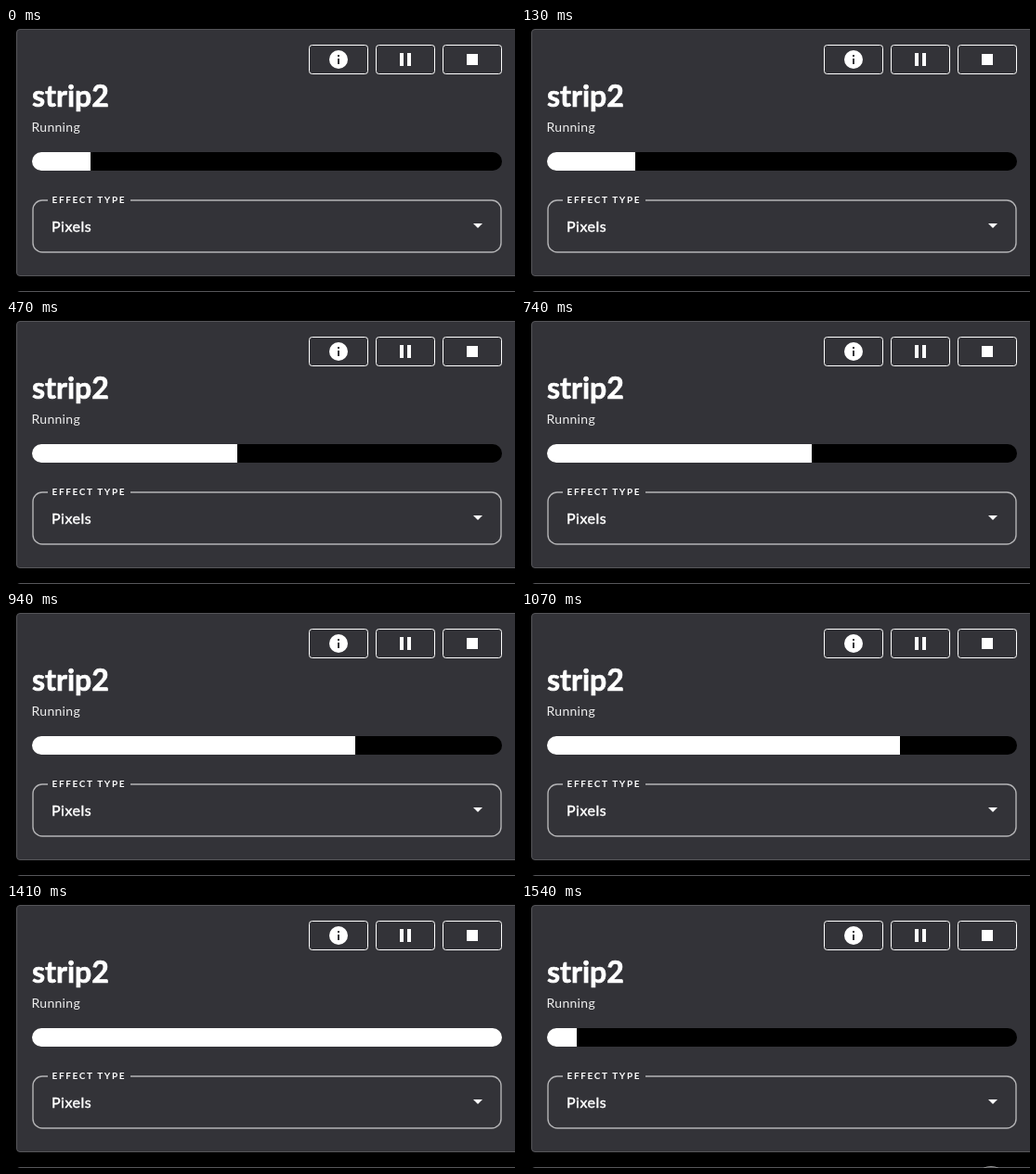
An HTML page for the animation above (1610 ms loop, 548 by 285 pixels).

```html
<!DOCTYPE html>
<html lang="en">
<head>
<meta charset="utf-8">
<title>Effect card</title>
<style>
  html, body { margin: 0; width: 100%; height: 100%; overflow: hidden; background: #000; }
  svg { display: block; }
  text { fill: #fff; stroke: #fff; stroke-width: 0; font-family: Lato, "Open Sans", sans-serif; }
  .card { fill: #333338; stroke: #56565a; }
  .button { fill: none; stroke: #fff; }
  .icon { fill: #fff; }
</style>
</head>
<body>
<svg width="548" height="285" viewBox="0 0 548 285">
  <defs>
    <clipPath id="pill"><rect x="28" y="134" width="506" height="20" rx="10"/></clipPath>
  </defs>

  <rect class="card" x="11.5" y="1.5" width="560" height="266" rx="3.5"/>
  <rect class="card" x="11.5" y="284.5" width="560" height="60" rx="3.5"/>
  <circle id="nextButton" cx="506" cy="303.5" r="20" fill="none" stroke="#999" visibility="hidden"/>

  <rect class="button" x="326.5" y="18.5" width="63" height="31" rx="3"/>
  <rect class="button" x="398.5" y="18.5" width="63" height="31" rx="3"/>
  <rect class="button" x="470.5" y="18.5" width="63" height="31" rx="3"/>
  <circle class="icon" cx="358" cy="34" r="10"/>
  <path fill="#333338" d="M357 29h2v2h-2zM357 33h2v6h-2z"/>
  <path class="icon" d="M424 27h4v14h-4zM432 27h4v14h-4zM496 28h12v12h-12z"/>

  <text x="28" y="84.5" font-size="32" font-weight="700" stroke-width=".7" style="stroke-width:.7">strip2</text>
  <text x="27.5" y="112" font-size="14" letter-spacing=".3" style="fill:#eee">Running</text>

  <g clip-path="url(#pill)">
    <rect x="28" y="134" width="506" height="20"/>
    <rect id="bar" class="icon" x="28" y="134" width="63" height="20"/>
  </g>

  <rect x="29" y="186" width="504" height="56" rx="10" fill="none" stroke="#b4b4b6" stroke-width="1.4"/>
  <rect x="45" y="184" width="89" height="4" fill="#333338"/>
  <text x="49.5" y="189" font-size="10" font-weight="700" letter-spacing="1.65">EFFECT TYPE</text>
  <text x="49" y="220" font-size="16" letter-spacing=".5" style="stroke-width:.45">Pixels</text>
  <path class="icon" d="M503 211h10l-5 5z"/>
</svg>
<script>
  const LOOP = 1610, SEGMENTS = 16, WIDTH = 506;
  // Moments at which the bar advances by one segment.
  const ticks = [130, 200, 330, 400, 470, 670, 740, 870, 940, 1070, 1140, 1210, 1340, 1410, 1540];
  const bar = document.getElementById("bar");
  const nextButton = document.getElementById("nextButton");

  function draw() {
    const time = performance.now() % LOOP;
    const passed = ticks.filter(tick => tick <= time).length;
    const filled = (passed + 1) % SEGMENTS + 1;
    bar.setAttribute("width", Math.round(filled * WIDTH / SEGMENTS));
    nextButton.setAttribute("visibility", time >= 1540 ? "visible" : "hidden");
    requestAnimationFrame(draw);
  }
  draw();
</script>
</body>
</html>
```
